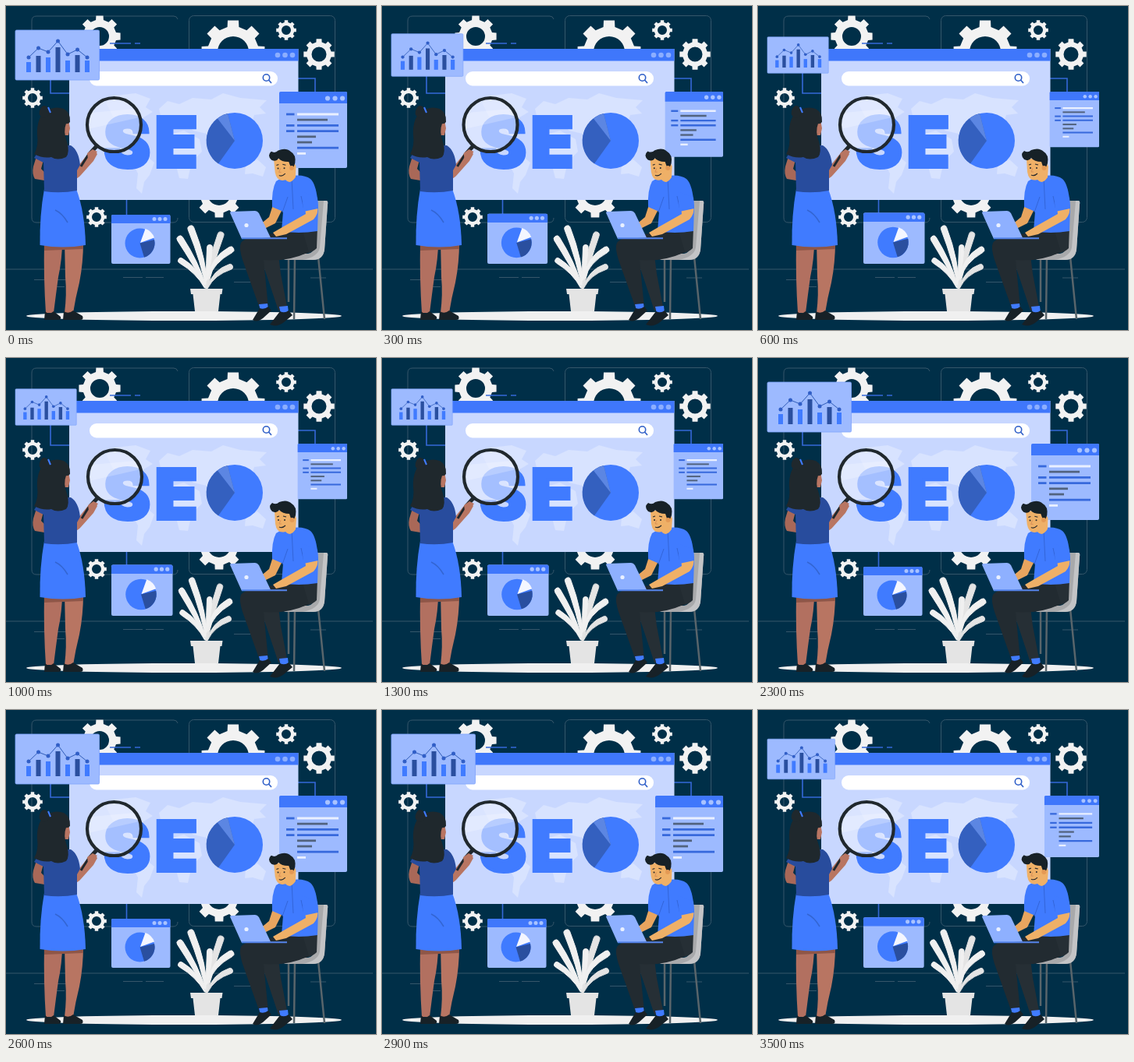
An HTML page for the animation above (3600 ms loop, 474 by 416 pixels).

```html
<!DOCTYPE html>
<html lang="en">
<head>
<meta charset="utf-8">
<style>
html, body { margin: 0; width: 100%; height: 100%; overflow: hidden; background: #002f48; }
svg { display: block; width: 474px; height: 416px; }
</style>
</head>
<body>
<svg viewBox="0 0 474 416" fill="none">
  <g stroke="#36566a" stroke-width="1">
    <path d="M220 17Q219 13 215 13H39Q33 13 33 19V272Q33 278 39 278H214Q220 278 220 272"/>
    <rect x="234.500" y="12.500" width="187" height="265" rx="6"/>
    <path d="M0 338H470M36 351.500H77M50 360.500H75M150 348.500H175M179 348.500H202M292 354.500H316M390 349H410"/>
  </g>
  <ellipse cx="228" cy="398" rx="202" ry="6" fill="#f0f0f0"/>
  <g id="gears" fill="#f2f2f2" fill-rule="evenodd"></g>
  <path d="M57 80V112H82M374 93H396V112M154.500 248V270M133 48H160M165 48H172" stroke="#3568d8" stroke-width="1.600"/>

  <rect x="81" y="55" width="293.500" height="194" fill="#c8d7ff"/>
  <g fill="#d8e3ff">
    <path d="M128 124L140 115L166 112L185 119L179 130L188 136L173 145L166 157L173 168L164 167L153 151L137 142Z"/>
    <path d="M164 192L177 190L190 201L184 217L177 226L174 241L167 234L169 215L162 202Z"/>
    <path d="M196 132L207 122L222 126L239 118L263 120L278 112L300 118L334 121L325 130L333 138L318 140L312 158L299 166L291 184L281 169L269 182L257 164L240 160L226 148L207 156L199 145Z"/>
    <path d="M203 167L228 160L248 171L251 187L238 200L233 222L222 221L215 194L202 184Z"/>
    <path d="M307 204L322 197L333 207L329 219L316 215L306 216Z"/>
  </g>
  <path d="M81 55H374.500V70.500H81Z" fill="#3f77fb"/>
  <g fill="#8caeff"><circle cx="348" cy="63" r="3.300"/><circle cx="357.500" cy="63" r="3.300"/><circle cx="367" cy="63" r="3.300"/></g>
  <rect x="107" y="84" width="241" height="18.500" rx="9" fill="#fff"/>
  <g stroke="#2f5fc8" stroke-width="1.600"><circle cx="333.500" cy="92" r="4.200"/><path d="M336.500 95L340 99"/></g>
  <g fill="#407bff" stroke="#407bff" stroke-width="4" font-family="Inter, 'Open Sans', sans-serif" font-weight="900" font-size="90">
    <text x="125" y="206.500">S</text><text x="190.500" y="206.500">E</text>
  </g>
  <circle cx="293" cy="173" r="36" fill="#407bff"/>
  <path d="M293 173L272 202.500A36 36 0 0 1 284 138.100Z" fill="#3460bf"/>
  <path d="M293 173L271 144.500A36 36 0 0 1 284 138.100Z" fill="#5c86e2"/>

  <g id="chart">
    <rect x="12" y="31" width="107.500" height="64" rx="1.500" fill="#9dbaff" stroke="#7fa4fb" stroke-width=".8"/>
    <g id="bars"></g>
  </g>

  <g id="code">
    <rect x="350" y="110" width="87" height="98" rx="2" fill="#9dbaff"/>
    <path d="M350 125V112Q350 110 352 110H435Q437 110 437 112V125Z" fill="#3f77fb"/>
    <g fill="#a9c3ff"><circle cx="412" cy="118.500" r="3.100"/><circle cx="421.500" cy="118.500" r="3.100"/><circle cx="431" cy="118.500" r="3.100"/></g>
    <g id="lines" stroke-width="2.800"></g>
  </g>

  <g id="pie">
    <rect x="135" y="268" width="75.500" height="63" rx="2" fill="#9dbaff"/>
    <path d="M135 279V270Q135 268 137 268H208.500Q210.500 268 210.500 270V279Z" fill="#3f77fb"/>
    <g fill="#a9c3ff"><circle cx="190" cy="273.500" r="2.500"/><circle cx="197" cy="273.500" r="2.500"/><circle cx="204" cy="273.500" r="2.500"/></g>
    <circle cx="171.500" cy="304.500" r="19" fill="#407bff"/>
    <path d="M171.500 304.500L190 300A19 19 0 0 1 177 322.700Z" fill="#2a4f9f"/>
    <path d="M172 304L178.500 286A19 19 0 0 1 190 297.500Z" fill="#f4f6ff"/>
  </g>

  <g id="leaves"></g>
  <path d="M236 363H277.500L276.500 370H274.500L272 392H242L239.500 370H237Z" fill="#e4e4e4"/>

  <!-- woman -->
  <path d="M49 302H72Q72 325 67 348Q64 370 61 394H51Q48 350 49 302Z" fill="#b27060"/>
  <path d="M75 302H99Q99 330 94 355Q89 375 86 394H75Q78 370 76 348Z" fill="#b87562"/>
  <path d="M49 304H99V312L49 314Z" fill="#8f5647"/>
  <path d="M50 392Q55 397 61 392L70 399Q71 403 67 403H49ZM74 392Q80 396 86 391L98 398Q100 403 95 403H73Z" fill="#172127"/>
  <path d="M40 190L35 206Q33 216 37 222L49 224L50 214L45 209L49 194Z" fill="#a96858"/>
  <path d="M49 235H90Q101 264 102 307Q73 312 43.500 307Q43 268 49 235Z" fill="#407bff"/>
  <path d="M63 262Q72 266 79 278" stroke="#3365d2" stroke-width="1.500"/>
  <path d="M82 205L86 222Q91 223 96 217L112 199L117 190L112 184L104 191L92 206Z" fill="#b87562"/>
  <path d="M46 180L36 195L48 201L49 238Q70 241 91 237L91 211L95 204Q93 185 83 179Z" fill="#284c9d"/>
  <path d="M74 140L80 146L82 157L80 166L73 166L72 181L63 180V149Z" fill="#b87562"/>
  <path d="M52 134Q64 128 74 132Q83 137 82 149Q79 152 77 151Q73 161 78 174Q82 188 77 194Q66 199 58 194Q47 196 36 190Q42 180 40 165Q39 143 52 134Z" fill="#1f282d"/>
  <path d="M55 132Q48 124 44 132Q40 139 47 144Q54 143 57 136Z" fill="#1f282d"/>
  <path d="M54 130L57 137" stroke="#407bff" stroke-width="2"/>

  <g id="lens">
    <circle cx="139.500" cy="152.500" r="34" fill="#e6edff" fill-opacity=".6"/>
    <path d="M110 137L166 132L172 143L106 158Z" fill="#fff" fill-opacity=".22"/>
    <circle cx="139.500" cy="152.500" r="34.500" stroke="#20282d" stroke-width="4.200"/>
    <path d="M117 180L108 190" stroke="#20282d" stroke-width="5"/>
    <path d="M107 190L97 206" stroke="#20282d" stroke-width="3"/>
    <path d="M105 189L112 184L118 187L112 195L106 196Z" fill="#b87562"/>
  </g>

  <!-- chair -->
  <path d="M370 322L369 402M400 322L408 402M362 325V380" stroke="#59656b" stroke-width="2.500"/>
  <path d="M398 250H410Q413 250 412 255L408 313Q406 326 393 326H358Q354 326 355 318H387Q394 317 395 309Z" fill="#a8a9ab"/>
  <path d="M407 250H410Q413 250 412 255L408 313Q406 326 393 326H380Q400 322 402 310Z" fill="#c3c4c6"/>

  <!-- man -->
  <path d="M399 284L398 311Q390 320 360 320H349L352 344L361 391H349L329 331Q326 316 335 305L348 289Z" fill="#262f35"/>
  <path d="M380 289L345 292Q309 294 301 304Q298 310 303 326L325 388L336 387L330 326Q360 329 388 316Z" fill="#222b31"/>
  <path d="M324 383L335 382L336 389L326 391ZM350 386L361 385L362 394L352 395Z" fill="#407bff"/>
  <path d="M325 388Q331 390 336 386L340 391L329 401Q321 407 316 403ZM351 392Q357 395 362 391L367 397L356 406Q347 413 338 409Z" fill="#172127"/>
  <path d="M344 249L337 271L325 281L329 287L345 279L359 251Z" fill="#e8a55f"/>
  <path d="M346 225Q354 219 366 218Q382 216 390 222Q398 229 400 258L399 289Q374 293 353 289L355 264L341 258Q340 236 346 225Z" fill="#407bff"/>
  <path d="M354 265L361 245M382 262L378 244M366 221L368 261" stroke="#3365d8"/>
  <path d="M383 259L399 257Q401 266 394 274L359 293L346 296L342 291L354 284L384 267Z" fill="#efb067"/>
  <path d="M379 238L399 246L400 260L381 264Z" fill="#407bff"/>
  <g id="head">
    <path d="M344 197L366 193L372 206L371 220Q364 230 358 223Q347 226 345 213Z" fill="#efb067"/>
    <path d="M341 197Q335 191 341 186Q346 189 350 185Q360 181 366 187Q373 191 371 202L369 207L365 206L363 200Q354 200 350 195Q347 200 341 197Z" fill="#172127"/>
    <circle cx="366.500" cy="208" r="3" fill="#e59a55"/>
    <path d="M347 204L350 203M355 203L359 204M350 217Q354 219 358 215" stroke="#27282b" stroke-width="1.100"/>
    <circle cx="349" cy="208" r="1" fill="#27282b"/><circle cx="357" cy="208" r="1" fill="#27282b"/>
    <path d="M352 208L350 213L353 213" stroke="#d28855" stroke-width=".8"/>
  </g>
  <path d="M287 265.500Q287 264 289 264L319 263Q322 263 324 266L339 297.500L302 299Z" fill="#8eb0ff"/>
  <path d="M302 297.300H360V299.300H302Z" fill="#5584ea"/>
  <circle cx="308" cy="281.500" r="2.600" fill="#e9f0ff"/>
</svg>
<script>
const $ = id => document.getElementById(id);
const BLUE = '#407bff', NAVY = '#2a4f9f';

function gear(cx, cy, r, hole, teeth = 8) {
  const points = [];
  const step = 2 * Math.PI / teeth;
  for (let i = 0; i < teeth; i++) {
    for (const [offset, scale] of [[-.29, .8], [-.22, 1], [.22, 1], [.29, .8]]) {
      const a = (i + offset) * step - Math.PI / 2;
      points.push((cx + r * scale * Math.cos(a)).toFixed(1) + ' ' + (cy + r * scale * Math.sin(a)).toFixed(1));
    }
  }
  return `<path d="M${points.join('L')}ZM${cx - hole} ${cy}a${hole} ${hole} 0 1 0 ${2 * hole} 0a${hole} ${hole} 0 1 0 ${-2 * hole} 0Z"/>`;
}
$('gears').innerHTML = [
  [120, 39, 27, 12], [291, 59, 41, 20], [359, 31, 13, 6], [401, 62, 20, 9.5],
  [34, 118, 13, 6], [116, 271, 13, 6], [273, 241, 31, 15]
].map(g => gear(...g)).join('');

// Each bar: top edge, then the height of its trend dot.
const bars = [[72, 66], [64, 54], [66, 59], [53, 45], [70, 62], [63, 56], [70, 66]];
const barX = i => 29 + i * 12.5;
$('bars').innerHTML =
  bars.map(([top], i) => `<rect x="${barX(i) - 3}" y="${top}" width="6" height="${85 - top}" fill="${i % 2 ? NAVY : BLUE}"/>`).join('') +
  `<polyline points="${bars.map(([, y], i) => barX(i) + ',' + y)}" stroke="#315db8" stroke-width="1"/>` +
  bars.map(([, y], i) => `<circle cx="${barX(i)}" cy="${y}" r="2.500" fill="#315fc7"/>`).join('');

const stroke = (x1, x2, y, color) => `<path d="M${x1} ${y}H${x2}" stroke="${color}"/>`;
$('lines').innerHTML = [
  [426, '#eaf0ff'], [412, '#52637e'], [426, '#3769dc'], [426, '#3769dc'],
  [397, '#52637e'], [392, '#52637e'], [426, '#3769dc'], [384, '#eaf0ff']
].map(([end, color], i) => stroke(373, end, 139 + i * 7.2, color)).join('') +
  [139, 153.4, 160.6].map(y => stroke(359, 369.500, y, '#3769dc')).join('');

// Leaf that widens from the stem at (bx, by) to a rounded tip, bent through (cx, cy).
function leaf(bx, by, cx, cy, x, y, r, color = '#f0f0f0') {
  const length = Math.hypot(x - cx, y - cy);
  const nx = (y - cy) / length * r, ny = (cx - x) / length * r;
  return `<path d="M${bx - .7} ${by}Q${cx + nx} ${cy + ny} ${x + nx} ${y + ny}` +
    `A${r} ${r} 0 0 1 ${x - nx} ${y - ny}Q${cx - nx} ${cy - ny} ${bx + .7} ${by}Z" fill="${color}" stroke="${color}" stroke-width="1"/>`;
}
$('leaves').innerHTML = [
  [257, 364, 254, 328, 237, 286, 4], [257, 364, 262, 330, 275, 294, 4, '#e4e4e4'],
  [255, 358, 243, 330, 223, 299, 4], [255, 362, 246, 340, 224, 327, 3.5],
  [259, 350, 264, 326, 288, 313, 4], [258, 362, 266, 342, 287, 335, 3.5, '#e4e4e4'],
  [257, 352, 260, 330, 261, 310, 3.5]
].map(l => leaf(...l)).join('');

const LOOP = 3600;
const ease = (t, start) => {
  const p = Math.min(1, Math.max(0, (t - start) / 500));
  return (1 - Math.cos(Math.PI * p)) / 2;
};
const scaleAt = (x, y, sx, sy = sx) => `translate(${x} ${y}) scale(${sx} ${sy}) translate(${-x} ${-y})`;

function draw(t) {
  const open = 1 - ease(t, 40) + ease(t, 1780) - ease(t, 3180);
  const size = .728 + .272 * open;
  const set = (id, transform) => $(id).setAttribute('transform', transform);
  set('chart', scaleAt(12, 63, size));
  set('code', scaleAt(437, 110, size));
  set('pie', scaleAt(135, 331, 1.04 - .04 * open));
  set('leaves', scaleAt(257, 364, .94 + .06 * open, 1));
  set('lens', `translate(${-open} 0)`);
  set('head', `rotate(${-2 * open} 364 222)`);
}

const begin = performance.now();
function tick() {
  draw((performance.now() - begin) % LOOP);
  requestAnimationFrame(tick);
}
draw(0);
requestAnimationFrame(tick);
</script>
</body>
</html>
```
